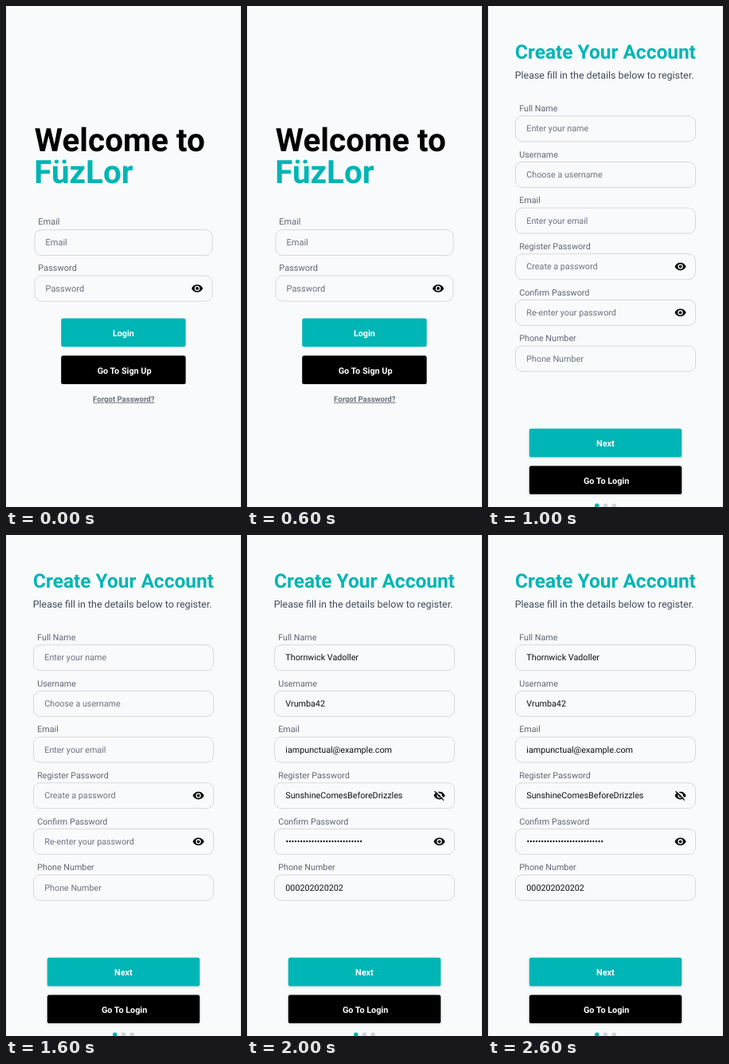
These frames come from a looping animation (295 px wide and 628 px high, 3 s). An HTML page:

```html
<!DOCTYPE html>
<html lang="en">
<head>
<meta charset="utf-8">
<title>Sign up flow</title>
<style>
  html, body { margin: 0; width: 100%; height: 100%; overflow: hidden; background: #f9fafb; }
  svg { display: block; width: 295px; height: 628px; }
  text { font-family: Roboto, sans-serif; text-rendering: geometricPrecision; }
  .login { font-size: 11px; }
  .register { font-size: 10.75px; }
  .head { font-weight: 600; }
  .login .head { font-size: 40.4px; }
  .register .head { font-size: 24.45px; }
  .lead { font-size: 12.45px; fill: #414b5a; }
  .label { fill: #5f6673; }
  .hint { fill: #6b7280; }
  .value { fill: #101114; }
  .btn { font-size: 10.8px; font-weight: 700; fill: #fff; text-anchor: middle; }
  .link { font-size: 9.55px; font-weight: 600; fill: #6b7280; text-anchor: middle; text-decoration: underline; }
  .box { fill: none; stroke: #d5d9df; }
  .lift { filter: drop-shadow(0 1.5px 1.5px rgba(0, 0, 0, .14)); }
</style>
</head>
<body>
<svg id="stage" viewBox="0 0 295 628">
  <defs>
    <path id="eye" fill-rule="evenodd" d="M12 4.5C7 4.5 2.73 7.61 1 12c1.73 4.39 6 7.5 11 7.5s9.27-3.11 11-7.5c-1.73-4.39-6-7.5-11-7.5zM12 17a5 5 0 1 1 0-10a5 5 0 0 1 0 10zM12 9a3 3 0 1 0 0 6a3 3 0 0 0 0-6z"/>
    <g id="eyeOff">
      <use href="#eye"/>
      <path d="M4 1.2L22.4 19.6" stroke="#f9fafb" stroke-width="2.2"/>
      <path d="M2.64 3.64L20.36 21.36" stroke="#000" stroke-width="1.8"/>
    </g>
  </defs>
  <rect width="295" height="628" fill="#f9fafb"/>
  <path d="M.5 0V628M294.5 0V628" stroke="#e6e7e9"/>
</svg>
<script>
const NS = 'http://www.w3.org/2000/svg';
const TEAL = '#00b5b5';
const STEP = 1000;
const stage = document.getElementById('stage');

function add(parent, tag, attrs = {}, content = '') {
  const el = document.createElementNS(NS, tag);
  for (const key in attrs) el.setAttribute(key, attrs[key]);
  el.textContent = content;
  return parent.appendChild(el);
}

const group = (parent, cls = '') => add(parent, 'g', { class: cls });

const text = (parent, cls, x, y, content, more) =>
  add(parent, 'text', { class: cls, x, y, ...more }, content);

const icon = (parent, name, cx, cy) =>
  add(parent, 'use', { href: '#' + name, transform: `translate(${cx - 7.7} ${cy - 7.7}) scale(.642)` });

const box = (parent, x, y, width) =>
  add(parent, 'rect', { class: 'box', x, y, width, height: 32, rx: 8.5 });

function button(parent, x, y, width, fill, label, cx, cls = '') {
  add(parent, 'rect', { x, y, width, height: 35.7, rx: 2.6, fill, class: cls });
  text(parent, 'btn', cx, y + 22.2, label);
}

// Login screen
const login = group(stage, 'login');
text(login, 'head', 35.8, 182, 'Welcome to');
text(login, 'head', 35.2, 222.4, 'FüzLor', { fill: TEAL });
['Email', 'Password'].forEach((name, i) => {
  const y = 280.5 + i * 57.6;
  text(login, 'label', 40.3, y - 6.2, name);
  box(login, 36, y, 223);
  text(login, 'hint', 49.5, y + 19.6, name);
});
icon(login, 'eye', 240, 354);
button(login, 69.2, 391.5, 156.4, TEAL, 'Login', 147.4);
button(login, 69.2, 438.3, 156.4, '#000', 'Go To Sign Up', 148.6);
text(login, 'link', 147.8, 495.8, 'Forgot Password?');

// Register screen
const register = group(stage, 'register');
text(register, 'head', 34, 66.3, 'Create Your Account', { fill: TEAL });
text(register, 'lead', 33.7, 91.4, 'Please fill in the details below to register.');

const blank = group(register);
const filled = group(register);
const fields = [
  ['Full Name', 'Enter your name', 'Thornwick Vadoller'],
  ['Username', 'Choose a username', 'Vrumba42'],
  ['Email', 'Enter your email', 'iampunctual@example.com'],
  ['Register Password', 'Create a password', 'SunshineComesBeforeDrizzles'],
  ['Confirm Password', 'Re-enter your password', ''],
  ['Phone Number', 'Phone Number', '000202020202'],
];
fields.forEach(([label, hint, value], i) => {
  const y = 137.8 + i * 57.65;
  text(register, 'label', 39.2, y - 5.9, label);
  box(register, 34.5, y, 226);
  text(blank, 'hint', 48.3, y + 19.6, hint);
  text(filled, 'value', 48.3, y + 19.6, value);
});
icon(blank, 'eye', 241.5, 326.6);
icon(filled, 'eyeOff', 241.5, 326.6);
icon(register, 'eye', 241.5, 384.3);

// Masked password
add(filled, 'path', {
  d: 'M50.3 384h93', stroke: '#101114', 'stroke-width': 2.3,
  'stroke-linecap': 'round', 'stroke-dasharray': '0 3.57',
});

button(register, 51.8, 529.8, 191.4, TEAL, 'Next', 147.4, 'lift');
button(register, 51.8, 576.4, 191.4, '#000', 'Go To Login', 148.6, 'lift');
[TEAL, '#d1d5db', '#d1d5db'].forEach((fill, i) =>
  add(register, 'circle', { cx: 136.8 + i * 10.7, cy: 626.3, r: 2.8, fill }));

const show = (el, on) => { el.style.display = on ? '' : 'none'; };

function draw(now) {
  const step = Math.floor(now / STEP) % 3;
  show(login, step === 0);
  show(register, step > 0);
  show(blank, step === 1);
  show(filled, step === 2);
}

const start = performance.now();
function tick() {
  draw(performance.now() - start);
  requestAnimationFrame(tick);
}
tick();
</script>
</body>
</html>
```
